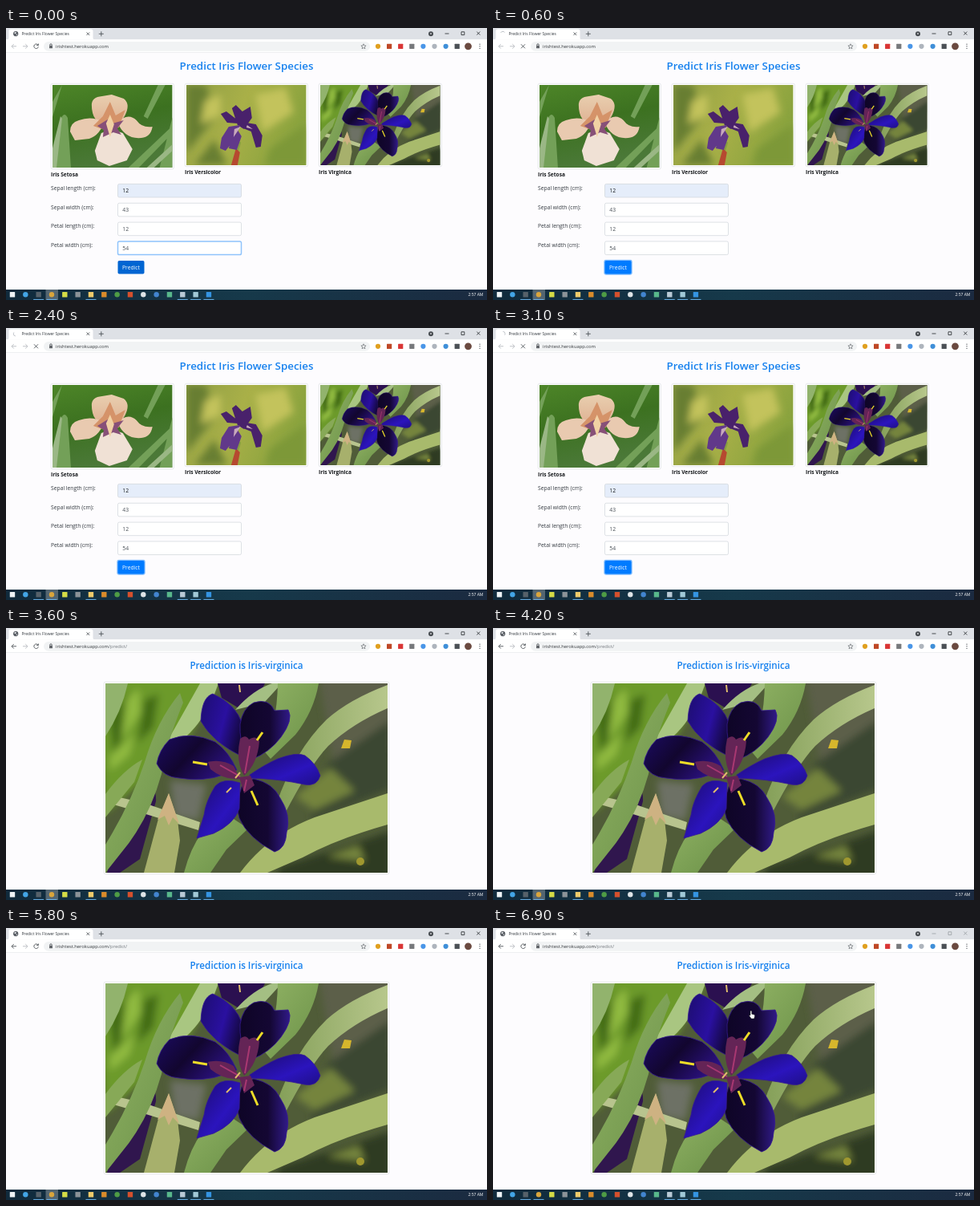
These frames come from a looping animation (600 by 339 pixels, 7 s). An HTML page:

```html
<!DOCTYPE html>
<html lang="en">
<head>
<meta charset="utf-8">
<title>Predict Iris Flower Species</title>
<style>
  html, body { margin: 0; width: 100%; height: 100%; overflow: hidden; background: #fdfcfe; }
  svg.stage { display: block; width: 100vw; height: 100vh; }
  text { font-family: "Open Sans", "Noto Sans", sans-serif; font-size: 6.75px; fill: #343a40; }
  .heading { font-weight: 600; font-size: 13.4px; fill: #1681ee; text-anchor: middle; }
  .caption { font-weight: 700; font-size: 6.6px; fill: #16191c; }
  .thumb { fill: #fff; stroke: #d5d9dd; stroke-width: .6; }
  .line { fill: none; stroke: #50555a; stroke-width: .9; }
</style>
</head>
<body>
<svg class="stage" viewBox="0 0 600 339" preserveAspectRatio="none">
  <defs>
    <filter id="soft" x="-20%" y="-20%" width="140%" height="140%"><feGaussianBlur stdDeviation="5"/></filter>
    <linearGradient id="bar"><stop stop-color="#102a3c"/><stop offset=".5" stop-color="#16394a"/><stop offset="1" stop-color="#1b2a40"/></linearGradient>
    <linearGradient id="upper" x2="1" y2=".4"><stop stop-color="#1d0d70"/><stop offset=".6" stop-color="#2a10a0"/><stop offset="1" stop-color="#14083f"/></linearGradient>
    <linearGradient id="night" x2="1"><stop stop-color="#0e0526"/><stop offset=".6" stop-color="#140733"/><stop offset="1" stop-color="#301a88"/></linearGradient>
    <linearGradient id="side" x2="1" y2=".5"><stop stop-color="#1b0b62"/><stop offset=".5" stop-color="#12062f"/><stop offset="1" stop-color="#2b1180"/></linearGradient>
    <linearGradient id="blue" x2="1" y2="1"><stop stop-color="#1c0b6e"/><stop offset=".6" stop-color="#2b14bd"/><stop offset="1" stop-color="#1f0f88"/></linearGradient>
    <linearGradient id="leaf" x2="1" y2="1"><stop stop-color="#90b264"/><stop offset="1" stop-color="#6b9148"/></linearGradient>
    <linearGradient id="pale" x2="1"><stop stop-color="#849f58"/><stop offset="1" stop-color="#b7c78c"/></linearGradient>
    <linearGradient id="grass" y2="1" x2=".3"><stop stop-color="#4d8528"/><stop offset=".5" stop-color="#3c7120"/><stop offset="1" stop-color="#4b7938"/></linearGradient>
    <linearGradient id="meadow" x2="1" y2=".3"><stop stop-color="#8f9e45"/><stop offset=".5" stop-color="#a9b048"/><stop offset="1" stop-color="#8aa33e"/></linearGradient>
    <linearGradient id="peach" x2="0" y2="1"><stop stop-color="#e9cfaf"/><stop offset="1" stop-color="#deb092"/></linearGradient>

    <symbol id="virginica" viewBox="124 69 352 236" preserveAspectRatio="none">
      <path fill="#505c38" d="M124 69h352v236H124z"/>
      <g filter="url(#soft)">
        <path fill="#6c9a2a" d="M110 60H270L220 150 124 230z"/>
        <path fill="#426c18" d="M128 110l24-30 12 26-30 50zM172 90l18-8-6 42-20 20z"/>
        <path fill="#90ba40" d="M150 88l16-12 2 30-24 34zM130 160l30-28-6 26-24 20z"/>
        <path fill="#5c5f49" d="M390 60h95v90l-75 30z"/>
        <path fill="#3b4630" d="M400 170l80-55v85l-100 40z"/>
        <path fill="#2d3a20" d="M340 298l80-25 60-20v60H340z"/>
        <path fill="#6d7165" d="M205 190l45 5-10 45-30-5z"/>
        <path fill="#74843e" d="M360 210l45-35 30 28-50 24zM400 285l40-14 8 20z"/>
      </g>
      <path fill="#92b36d" d="M124 69h28q-8 36-28 66z"/>
      <path fill="#a9c681" d="M242 69h23q-16 47-45 70l-22 8z"/>
      <path fill="#2b1050" d="M264 69h59l-9 18-25 12-20-12z"/>
      <path fill="#a4bf83" d="M286 102q22-25 46-33h12l-22 24z"/>
      <path fill="url(#leaf)" d="M339 69h51q-6 35-29 64l-31 30-10-12q18-27 19-82z"/>
      <path fill="url(#pale)" d="M476 71v29q-44 19-74 47-23 24-55 86l-10-13q23-67 63-106 28-25 76-43z"/>
      <path fill="#30164e" d="M178 198q10 2 9 18l-20 72-25 17h-16l12-40q14-40 40-67z"/>
      <path fill="#b8c48e" d="M124 207l48 11 70 24-2 10-72-22-44-13z"/>
      <path fill="#87a957" d="M124 207q22-30 46-43l-10 28-36 44z"/>
      <path fill="url(#leaf)" d="M124 270q32-52 49-103 15-51 44-86l4 12q-22 54-27 89-16 58-51 99l-19 24z"/>
      <path fill="url(#leaf)" d="M222 305q14-54 50-75l30 20-27 26-20 29z"/>
      <path fill="#a8ba6c" d="M476 206v39q-64 18-106 41l-44 19h-34q35-47 93-69z"/>
      <path fill="#a7b06c" d="M203 206l-13 32-18 67h38l7-40-3-26z"/>
      <path fill="#ceb282" d="M203 206l-14 33 9-5 5 12 5-10 8 8z"/>
      <g stroke="#371b92" stroke-width=".8">
        <path fill="url(#upper)" d="M296 161Q258 143 243 116q1-30 15-34 29 13 37 38 4 18 1 41z"/>
        <path fill="url(#night)" d="M299 164q-8-25-7-44 3-20 17-27 19-6 26 10l17-1q7 12-9 34-14 19-37 28z"/>
        <path fill="url(#side)" d="M288 177q-10-23-27-35-31-14-57-3-13 13-16 30 8 17 28 18 30 5 55-4z"/>
        <path fill="url(#blue)" d="M304 183q19-13 35-20 24-9 34-4 14 10 19 25-4 14-20 11-31-7-68-8z"/>
        <path fill="url(#night)" d="M296 192q-11 29-5 45 11 25 44 42 14-4 15-24 6-22-8-43-9-19-33-24z"/>
        <path fill="url(#blue)" d="M292 193q-21-7-31 4-12 19-14 36l-9 29 21-6q26-12 32-31z"/>
      </g>
      <path fill="#642456" d="M297 184q-11-18-5-46 7-6 11 1 8-6 13 2-2 28-19 43zM292 188q-20 2-37-12l-3-9q17-4 32 5zM291 186l14-2 5 12-13 10z"/>
      <path fill="none" stroke="#a83871" stroke-width="2" d="M292 185l-25-14M298 181l6-34M300 189l-3 14"/>
      <path fill="none" stroke="#eddc28" stroke-width="3" d="M233 167l18 3M313 140l7-10M306 203l8 18"/>
      <path fill="none" stroke="#e0bd6c" stroke-width="2" d="M286 187l6-7M275 205l6-6M291 71l1 9"/>
      <path fill="#d6b62c" d="M418 150l4-11 9 1-2 10z"/><circle cx="442" cy="291" r="5" fill="#a0982f"/>
    </symbol>

    <symbol id="setosa" viewBox="58 71 150 103" preserveAspectRatio="none">
      <path fill="url(#grass)" d="M58 71h150v103H58z"/>
      <path fill="#73a058" d="M62 174l7-62q4-8 8 0l4 62zM70 71l-12 40V92zM153 174l55-52v9l-42 43zM192 174l16-63v63zM190 71h9l-22 42-5-3z"/>
      <path fill="#9ab785" d="M58 150l10-40 2 3-7 61h-5zM176 174l32-29v8l-23 21z"/>
      <path fill="url(#peach)" d="M127 122q-20-3-20-26 0-10 13-11l12-2 15 5q8 6 3 18-5 14-23 16z"/>
      <path fill="#e9cab0" d="M122 117q-15-8-31-2-11 3-11 14l6 11 18-2q14-5 18-21zM139 117q14-12 24-2 7 10 20 8-2 13-14 14-21 2-30-20z"/>
      <path fill="#f0e1d5" d="M119 131q13-7 27 0l12 20-7 14-22 7-15-7-3-12z"/>
      <path fill="#d59369" d="M121 110l9-18 7 17 12-7-8 22-15 4-17-6z"/>
      <path fill="#875078" d="M114 122l13-8 6 5 14-4-8 10 5 8-10-3-13 6 1-9z"/>
      <path fill="#f1d1a4" d="M125 119l5-11 5 12-5 16z"/>
    </symbol>

    <symbol id="versicolor" viewBox="225 71 150 100" preserveAspectRatio="none">
      <path fill="url(#meadow)" d="M225 71h150v100H225z"/>
      <g filter="url(#soft)">
        <path fill="#687e33" d="M225 71h25l8 44-33 40zM235 171l25-32 16 32z"/>
        <path fill="#c3c35c" d="M311 83l38-9 10 31-39 25zM248 91l20-8v25l-25 12z"/>
        <path fill="#7d9837" d="M330 150l45-30v51h-52z"/>
      </g>
      <path fill="none" stroke="#879e40" stroke-width="3" d="M292 142l-9 29"/>
      <path fill="#b64930" d="M287 150l5 5-3 16h-8z"/>
      <path fill="#49216b" d="M289 121l-7-21 5-4 8 8 10-6 2 14-10 14zM290 119l-14-1-8-11 7-3 13 10zM300 118l12 2 8 14-2 14-6 1-6-20-10-4z"/>
      <path fill="#61388a" d="M292 121l-14 2-9 14-2 13 7 3 12-15zM289 127l-8 12-3 11 10 2 6-17z"/>
      <path fill="#c8a9bd" d="M285 126l8-3-9 13zM301 121l7 5-8-2z"/>
    </symbol>
  </defs>

  <rect width="600" height="339" fill="#fdfcfe"/>

  <g id="form">
    <text class="heading" x="300" y="52">Predict Iris Flower Species</text>
    <g id="cards"></g>
    <g id="rows"></g>
    <rect id="ring" x="138.3" y="288.8" width="35.4" height="18.9" rx="2.4" fill="#80bdff"/>
    <rect id="button" x="139.5" y="290" width="33" height="16.5" rx="1.7"/>
    <text x="145" y="300.7" style="fill:#fff">Predict</text>
  </g>

  <g id="result">
    <text class="heading" x="300" y="50.6" style="font-size:11.7px">Prediction is Iris-virginica</text>
    <rect class="thumb" x="122.3" y="67.3" width="355.4" height="239.4" rx="1.5"/>
    <use href="#virginica" x="124" y="69" width="352" height="236"/>
  </g>

  <g id="browser">
    <rect width="600" height="14.5" fill="#dee1e6"/>
    <path fill="#fff" d="M1 14.5q2.5 0 2.5-2.5V4q0-2.5 2.5-2.5h100q2.5 0 2.5 2.5v8q0 2.5 2.5 2.5z"/>
    <rect y="14.3" width="600" height="16.2" fill="#fff"/>
    <path stroke="#e4e6e9" stroke-width=".6" d="M0 30.5h600"/>
    <g id="globe"><circle cx="12.2" cy="7.2" r="3.1" fill="#555a60"/><path fill="#e8eaed" d="M10 6l2-1.3 1 1.2-1.5 1.6zM12.5 8l1.8-.5-.8 2z"/></g>
    <circle id="spinner" cx="12.2" cy="7.2" r="2.9" fill="none" stroke="#b5bac0" stroke-width=".8" stroke-dasharray="6 12.3"/>
    <text x="19.4" y="9.1" style="font-size:4.95px">Predict Iris Flower Species</text>
    <path class="line" stroke-width=".7" d="M100.5 5.5l3.6 3.6m0-3.6l-3.6 3.6M115.8 7.3h6m-3-3v6"/>
    <rect x="47" y="17" width="407" height="11.8" rx="5.9" fill="#f1f3f4"/>
    <path id="back" class="line" d="M13 22.8H7m2.8-2.8L7 22.8l2.8 2.8"/>
    <path class="line" style="stroke:#b9bdc1" d="M21 22.8h6m-2.8-2.8l2.8 2.8-2.8 2.8"/>
    <path id="reload" class="line" d="M40 21.2a2.8 2.8 0 1 0 .4 2.2M40.4 19.5v2.2h-2.3"/>
    <path id="stop" class="line" d="M35 20.3l5 5m0-5l-5 5"/>
    <rect x="54" y="22" width="4" height="3.3" rx=".4" fill="#5f6368"/><path class="line" stroke-width=".7" d="M54.8 22v-1a1.2 1.2 0 0 1 2.4 0v1"/>
    <text x="62" y="24.8" style="font-size:5.8px;fill:#33373b">irishtest.herokuapp.com<tspan id="path" fill="#74797f">/predict/</tspan></text>
    <path class="line" style="stroke-width:.6" d="M446 19.8l.9 2.1 2.2.2-1.7 1.5.5 2.2-1.9-1.2-1.9 1.2.5-2.2-1.7-1.5 2.2-.2z"/>
    <g id="extensions"></g>
    <g fill="#5f6368"><circle cx="591" cy="20.2" r=".7"/><circle cx="591" cy="22.8" r=".7"/><circle cx="591" cy="25.4" r=".7"/></g>
    <circle cx="530" cy="7.3" r="3" fill="#45494e"/><path d="M528.7 6.6h2.6l-1.3 1.6z" fill="#fff"/>
    <path id="controls" class="line" d="M547.5 7h5M568 4.8h3.8v3.8H568zM587.3 4.6l4 4m0-4l-4 4"/>
  </g>

  <g>
    <rect y="326" width="600" height="13" fill="url(#bar)"/>
    <rect id="active" x="49.5" y="326" width="15.5" height="13" fill="#536571"/>
    <g id="taskbar"></g>
    <text x="576.5" y="334" style="font-size:5px;fill:#fff">2:57 AM</text>
  </g>

  <path id="cursor" fill="#fff" stroke="#222" stroke-width=".5" d="M321 103.5q1-1 1.8.2v3.5l3 .8q1 .6.7 2l-.8 3h-3.5l-2.7-3.8q.2-1 1.5-.2z"/>
</svg>

<script>
const LOOP = 7000, CLICK = 100, LOADED = 3200, BLUR = 6400, POINTER = 6500;
const el = id => document.getElementById(id);
const show = (id, on) => el(id).style.display = on ? "" : "none";
const dot = (x, y, r, fill) => `<circle cx="${x}" cy="${y}" r="${r}" fill="${fill}"/>`;
const box = (x, y, r, fill) => `<rect x="${x - r}" y="${y - r}" width="${2 * r}" height="${2 * r}" rx=".5" fill="${fill}"/>`;

el("cards").innerHTML = [["Setosa", 103], ["Versicolor", 100], ["Virginica", 100]].map(([name, h], i) => {
  const x = 56.3 + 167 * i;
  return `<rect class="thumb" x="${x}" y="69.3" width="153" height="${h + 3.4}" rx="1.5"/>
    <use href="#${name.toLowerCase()}" x="${x + 1.7}" y="71" width="149.6" height="${h}"/>
    <text class="caption" x="${x - .3}" y="${h + 81.6}">Iris ${name}</text>`;
}).join("");

el("rows").innerHTML = [["Sepal length", 12], ["Sepal width", 43], ["Petal length", 12], ["Petal width", 54]].map(([name, value], i) => {
  const y = 194.4 + 23.85 * i;
  return `<text x="56" y="${y + 7.3}">${name} (cm):</text>
    <rect class="field" x="139.5" y="${y}" width="154" height="16.6" rx="1.8" fill="${i ? "#fff" : "#e5edfa"}" stroke="#ced4da" stroke-width=".7"/>
    <text x="145.3" y="${y + 10.9}" style="fill:${i ? "#495057" : "#16191c"}">${value}</text>`;
}).join("");
const lastField = document.querySelectorAll(".field")[3];

el("extensions").innerHTML =
  [["#e0a020", dot], ["#bf4827", box], ["#d93636", box], ["#77797c", box], ["#4a96e8", dot],
   ["#aeb5bd", dot], ["#3f8fd8", dot], ["#4c5156", box]]
  .map(([color, shape], i) => shape(464 + 14.1 * i, 22.8, 3.1, color)).join("") + dot(576.5, 22.8, 4.4, "#6b4a40");

el("taskbar").innerHTML =
  [["#eef3f6", box], ["#43a5e6", dot], ["#56616a", box], ["#d9a53c", dot], ["#d4dc46", box], ["#8b9298", box],
   ["#efcb6b", box], ["#d88b2b", box], ["#4e9c45", dot], ["#d4502d", box], ["#dfe5e8", dot], ["#4285cf", dot],
   ["#58b88b", box], ["#b9cad6", box], ["#a1c9d7", box], ["#3494e2", box]]
  .map(([color, shape], i) => shape(8 + 16.33 * i, 332.2, 3.2, color)
    + ([2, 3, 6, 13, 14, 15].includes(i) ? `<path stroke="#6bb5ec" d="M${1.5 + 16.33 * i} 338.4h13"/>` : "")).join("");

function draw(now) {
  const t = now % LOOP, loading = t >= CLICK && t < LOADED, done = t >= LOADED, focused = t < BLUR;
  show("form", !done);
  show("result", done);
  show("path", done);
  show("globe", !loading);
  show("reload", !loading);
  show("spinner", loading);
  show("stop", loading);
  show("ring", loading);
  show("active", focused);
  show("cursor", t >= POINTER);
  el("button").setAttribute("fill", loading ? "#007bff" : "#0065d2");
  el("back").style.stroke = done ? "#50555a" : "#b9bdc1";
  el("controls").style.stroke = focused ? "#34383c" : "#a0a5aa";
  lastField.setAttribute("stroke", loading ? "#ced4da" : "#8fc3fb");
  lastField.setAttribute("stroke-width", loading ? .7 : 1.5);
  el("spinner").setAttribute("transform", `rotate(${-t * .26} 12.2 7.2)`);
  requestAnimationFrame(() => draw(performance.now()));
}
draw(0);
</script>
</body>
</html>
```
